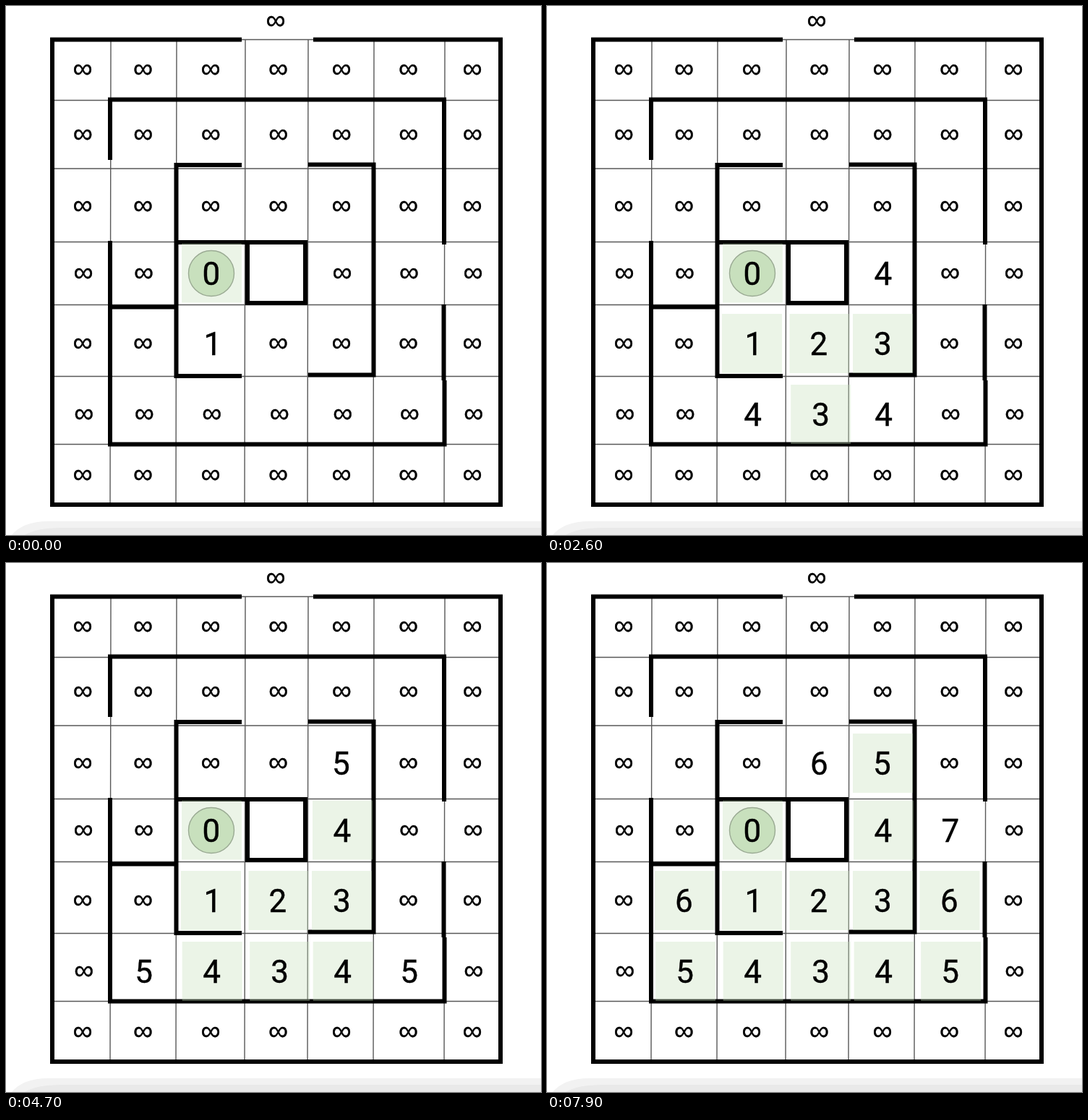
Animation of 740 by 732 pixels, one loop 8000 ms. Source, as an HTML page with a canvas:

```html
<!DOCTYPE html>
<html lang="en">
<head>
<meta charset="utf-8">
<title>Maze distances</title>
<style>
html, body { margin: 0; width: 100%; height: 100%; overflow: hidden; background: #fff; }
canvas { display: block; }
</style>
</head>
<body>
<canvas id="stage" width="740" height="732"></canvas>
<script>
const ctx = document.getElementById('stage').getContext('2d');
const LOOP = 8000;
const GAPS = '0766777766776'; // pauses between steps, in tenths of a second

const colX = [106, 189.5, 283, 376.5, 464, 556.5, 645];
const rowY = [88, 178, 277, 369.5, 467, 565, 649];
const centre = (col, row) => [colX[col] + row % 2 * row / 3, rowY[row]];

const grid = new Path2D('M326 46.5H425');
for (const x of [145, 236, 331, 418, 509, 607]) {
  grid.moveTo(x, 47);
  grid.lineTo(x - 1, 690);
}
for (const y of [130.5, 225, 326.5, 413.5, 512.5, 606.5]) {
  grid.moveTo(64, y);
  grid.lineTo(684, y);
}

const walls = new Path2D(`M326 46.5H64V690H684V46.5H425
  M144 213V129.5H606V330
  M326 220H235.5V512H326M418 219.5H508.5V510.5H418
  M236 327H334V411H414V327H334
  M144 325V606.5H606.5V518M605.5 518V413M145 416.5H233`);

// A passage is open when no wall lies halfway between the two cells
function open(a, b) {
  const [ax, ay] = centre(a.col, a.row), [bx, by] = centre(b.col, b.row);
  ctx.lineWidth = 20;
  return !ctx.isPointInStroke(walls, (ax + bx) / 2, (ay + by) / 2);
}

// Breadth-first search, noting when each cell is numbered and shaded
function search() {
  const first = { col: 2, row: 3, dist: 0, shown: 0 };
  const cells = [first], queue = [first];
  let time = 0;
  for (const gap of GAPS) {
    time += gap * 100;
    const cell = queue.shift();
    cell.shaded = time;
    const found = [[-1, 0], [1, 0], [0, 1], [0, -1]]
      .map(([dx, dy]) => ({ col: cell.col + dx, row: cell.row + dy, dist: cell.dist + 1, shown: time }))
      .filter(n => open(cell, n) && !cells.some(c => c.col === n.col && c.row === n.row));
    cells.push(...found);
    // Forks go ahead of other cells at the same distance
    const at = found.length > 1 ? queue.findIndex(c => c.dist > cell.dist) : -1;
    queue.splice(at < 0 ? queue.length : at, 0, ...found);
  }
  return cells;
}
const cells = search();

function line(path, width, color) {
  ctx.lineWidth = width;
  ctx.strokeStyle = color;
  ctx.stroke(path);
}

function shelf(left, top, color) {
  ctx.fillStyle = color;
  ctx.beginPath();
  ctx.moveTo(left, 732);
  ctx.quadraticCurveTo(left + 16, top, left + 50, top);
  ctx.lineTo(740, top);
  ctx.lineTo(740, 732);
  ctx.fill();
}

// Centre the visible glyph on a point
function label(text, x, y, font) {
  ctx.font = font;
  const m = ctx.measureText(text);
  const left = x - (m.actualBoundingBoxRight - m.actualBoundingBoxLeft) / 2;
  const base = y + (m.actualBoundingBoxAscent - m.actualBoundingBoxDescent) / 2;
  ctx.fillStyle = ctx.strokeStyle = '#000';
  ctx.lineWidth = .4;
  ctx.fillText(text, left, base);
  ctx.strokeText(text, left, base);
}
const digit = (n, x, y) => label(String(n), x, y, '44px Roboto, Arial, sans-serif');
const infinity = (x, y) => label('∞', x, y, '38px "Liberation Sans", Arial, sans-serif');

function draw(t) {
  ctx.fillStyle = '#fff';
  ctx.fillRect(0, 0, 740, 732);
  shelf(8, 713, '#f2f2f2');
  shelf(26, 722, '#e9e9e9');
  line(grid, 1.4, '#585858');
  line(walls, 6, '#000');

  ctx.fillStyle = 'rgba(198,224,186,.35)';
  for (const { col, row, shaded } of cells) {
    const [x, y] = centre(col, row);
    if (t >= shaded) ctx.fillRect(x - 41, y - 41, 83, 82);
  }

  const disc = new Path2D();
  disc.arc(284, 370, 31.5, 0, 7);
  ctx.fillStyle = '#c8e0bd';
  ctx.fill(disc);
  line(disc, 1.4, '#9aaa93');

  infinity(373, 20.5);
  for (let row = 0; row < 7; row++) for (let col = 0; col < 7; col++) {
    if (row === 3 && col === 3) continue; // the closed cell
    const cell = cells.find(c => c.col === col && c.row === row && t >= c.shown);
    const [x, y] = centre(col, row);
    if (cell) digit(cell.dist, x, y);
    else infinity(x, y);
  }
}

function frame() {
  draw(performance.now() % LOOP);
  requestAnimationFrame(frame);
}
frame();
</script>
</body>
</html>
```
